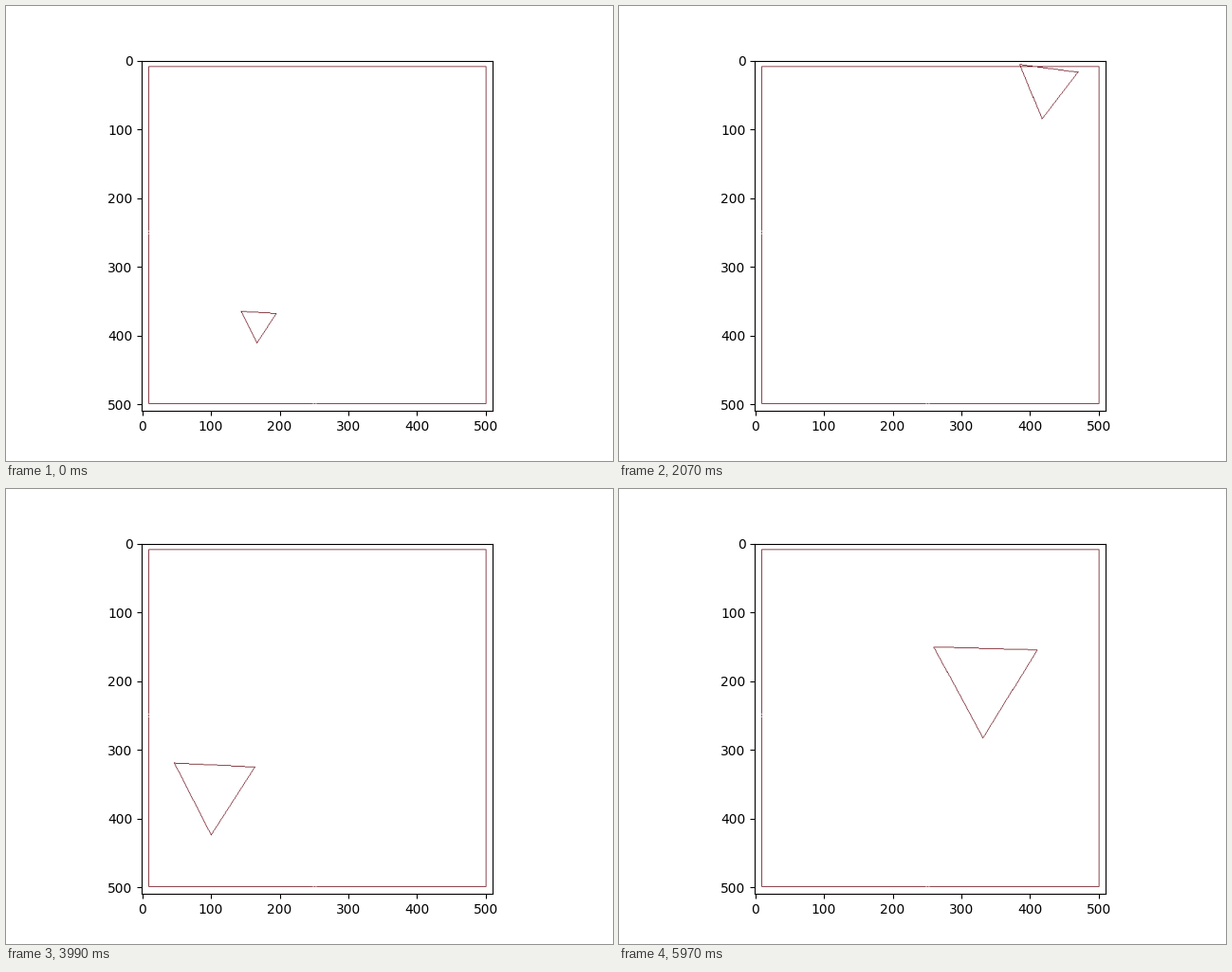
A matplotlib script that plays this animation: 640 px wide and 480 px high, repeating every 6 s.

```python
import numpy as np
import matplotlib.pyplot as plt
from matplotlib.animation import FuncAnimation

FRAMES, INTERVAL = 200, 30
SIZE, SPEED = 510, 5
INK = (96, 0, 12)
LOW, HIGH = np.array([10, 9]), np.array([500, 499])


def draw_polygon(img, points):
    """Rasterise a closed outline, one pixel wide."""
    for a, b in zip(points, np.roll(points, -1, axis=0)):
        steps = int(np.ceil(abs(b - a).max()))
        cols, rows = np.floor(np.linspace(a, b, steps + 1)).astype(int).T
        inside = (cols >= 0) & (cols < SIZE) & (rows >= 0) & (rows < SIZE)
        img[rows[inside], cols[inside]] = INK


def ngon(center, radius, turn, sides):
    angles = np.radians(turn) + 2 * np.pi * np.arange(sides) / sides
    return center + radius * np.column_stack([np.cos(angles), np.sin(angles)])


def bounce():
    """Triangle outlines of a whole loop: growing, spinning, turned by walls."""
    center = np.array([169.4, 381.7])
    velocity = np.array([SPEED, -SPEED])
    path = []
    for i in range(FRAMES):
        side = 51 + 0.5 * i
        points = ngon(center, side / np.sqrt(3), 93.4 + 1.8 * i, 3)
        velocity[points.min(axis=0) < LOW] = SPEED
        velocity[points.max(axis=0) > HIGH] = -SPEED
        center = center + velocity
        path.append(points)
    return path


path = bounce()
room = np.full((SIZE, SIZE, 3), 255, np.uint8)
middle = (LOW + HIGH) / 2
draw_polygon(room, ngon(middle, 245 * np.sqrt(2), 45, 4).round())

fig, ax = plt.subplots(figsize=(6.4, 4.8), dpi=100)
picture = ax.imshow(room)


def update(i):
    img = room.copy()
    draw_polygon(img, path[i])
    picture.set_data(img)
    return [picture]


anim = FuncAnimation(fig, update, frames=FRAMES, interval=INTERVAL,
                     repeat=True, repeat_delay=0)
plt.show()
```
